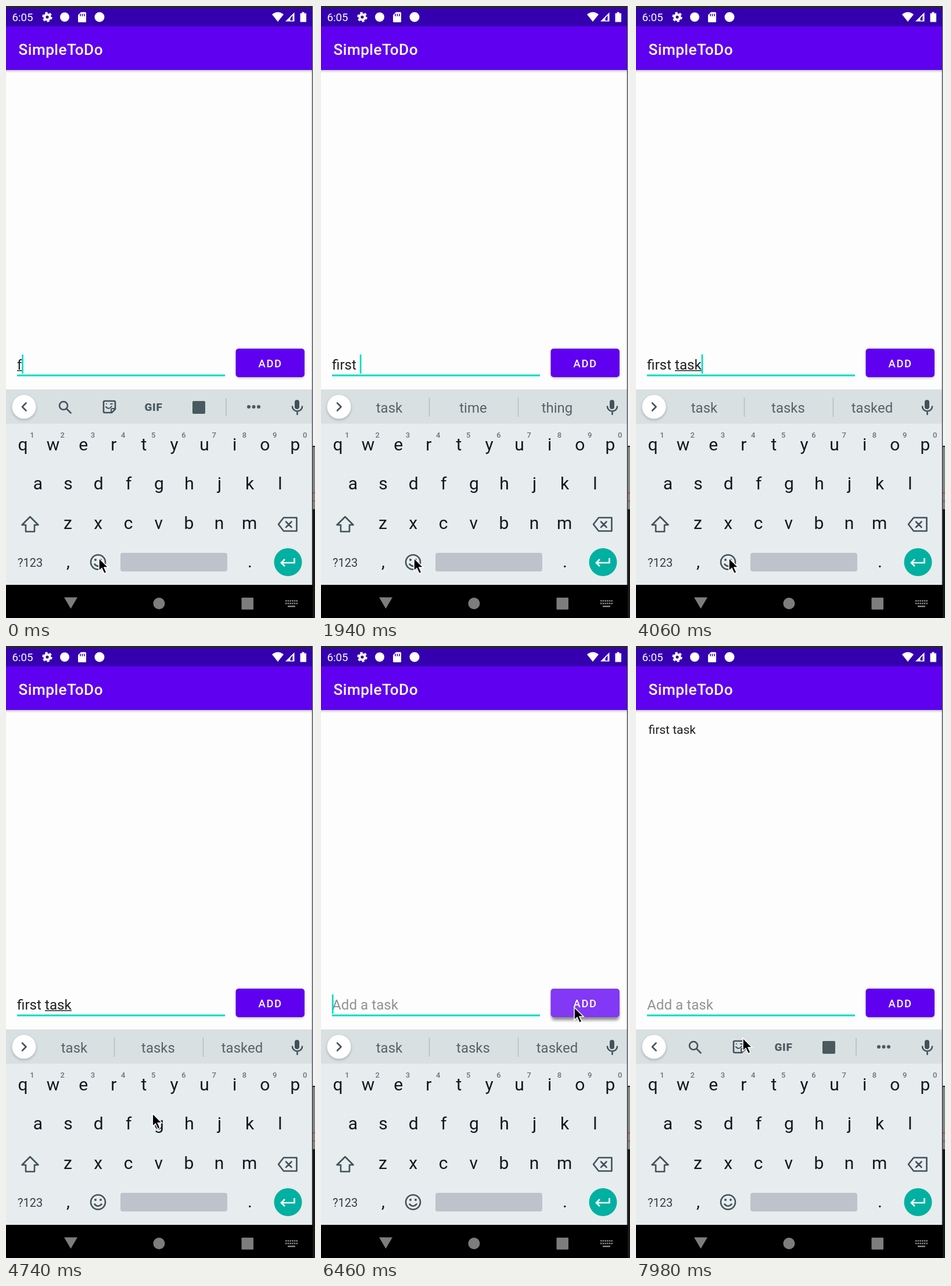
Recreate the animation shown at these times as an HTML page. Size 532x1052 px, loop 8 s.

```html
<!DOCTYPE html>
<html lang="en">
<head>
<meta charset="utf-8">
<title>To-do list</title>
<style>
html, body { margin: 0; width: 100%; height: 100%; overflow: hidden; background: #fdfdfd; }
svg { display: block; width: 100vw; height: 100vh; font-family: Roboto, Arial, sans-serif; }
text { white-space: pre; }
.mid { text-anchor: middle; }
.key { font-size: 30px; fill: #10191d; }
.digit { font-size: 13px; font-weight: 500; fill: #68747a; }
.word { font-size: 24px; fill: #566267; }
.line { fill: none; stroke: #42525a; stroke-width: 2.6; stroke-linejoin: round; stroke-linecap: round; }
</style>
</head>
<body>
<svg id="stage" viewBox="0 0 532 1052">
  <defs>
    <filter id="soft" x="-30%" y="-40%" width="160%" height="200%"><feGaussianBlur stdDeviation="2.5"/></filter>
    <linearGradient id="drop" x2="0" y2="1">
      <stop stop-color="#000" stop-opacity=".2"/><stop offset="1" stop-color="#000" stop-opacity="0"/>
    </linearGradient>
  </defs>
  <rect width="532" height="1052" fill="#fdfdfd"/>

  <!-- window behind the phone -->
  <rect x="528" width="4" height="757" fill="#f4f4f6"/>
  <rect x="528" y="757" width="4" height="108" fill="#858585"/>
  <path d="M528 757h4" stroke="#222" stroke-width="2"/>
  <path d="M528 837h4M528 851h4" stroke="#c0443c" stroke-width="2"/>
  <rect x="528" y="865" width="4" height="187" fill="#19191c"/>

  <!-- app and status bars -->
  <rect width="528" height="5" fill="#292435"/>
  <rect y="4" width="528" height="32" fill="#3500b0"/>
  <rect y="35" width="528" height="75" fill="#5f00f0"/>
  <rect y="110" width="528" height="5" fill="url(#drop)"/>
  <text x="10.5" y="26" font-size="18.7" fill="#fff">6:05</text>
  <g fill="#fff">
    <circle cx="71" cy="19" r="4.6" fill="none" stroke="#fff" stroke-width="4"/>
    <circle cx="71" cy="19" r="7.2" fill="none" stroke="#fff" stroke-width="3" stroke-dasharray="4 3.54"/>
    <circle cx="101" cy="19" r="8"/>
    <path d="M129 10.500h7.500q1.500 0 1.500 1.500v14.500q0 1.500-1.500 1.500h-11q-1.500 0-1.500-1.500v-11z"/>
    <path d="M128 13.500v4M131.500 13.500v4M135 13.500v4" stroke="#3500b0" stroke-width="1.600"/>
    <circle cx="161" cy="19" r="8.500"/>
    <path d="M458 14.500q10-8 20 0l-10 12.500z"/>
    <path d="M481 26.500L496.500 11v15.500z"/>
    <path d="M489.500 21v4h4v-9z" fill="#3500b0"/>
    <path d="M509.500 10.500h4v2h3.500v15h-10.500v-15h3z"/>
  </g>
  <text x="21.500" y="84" font-size="26.2" font-weight="500" letter-spacing=".45" fill="#fff">SimpleToDo</text>
  <text id="item" x="21.500" y="151" font-size="21" fill="#1d1d1d">first task</text>

  <!-- entry field -->
  <rect x="19" y="633.500" width="358" height="3" fill="#00dcc3"/>
  <text id="entry" x="19" y="624.500" font-size="24.2" fill="#202020"></text>
  <text id="hint" x="19" y="624.500" font-size="24.2" fill="#929292">Add a task</text>
  <rect id="underline" y="626" height="1.500" fill="#202020"/>
  <rect id="caret" y="599" width="2.700" height="33" fill="#00dcc3"/>

  <!-- add button -->
  <rect id="shadow" x="397" y="592" width="116" height="49" rx="5" filter="url(#soft)"/>
  <rect x="395.500" y="589" width="118.500" height="49" rx="5" fill="#5f00f0"/>
  <rect id="ripple" x="395.500" y="589" width="118.500" height="49" rx="5" fill="#fff"/>
  <text x="434.500" y="621" font-size="18.4" font-weight="500" letter-spacing="1.640" fill="#fff">ADD</text>

  <!-- keyboard -->
  <rect y="659" width="528" height="60" fill="#d9e0e2"/>
  <rect y="718" width="528" height="277" fill="#e7edee"/>
  <circle cx="31" cy="691" r="20.500" opacity=".22" filter="url(#soft)"/>
  <circle cx="31" cy="689" r="20.500" fill="#fff"/>
  <path id="chevron" class="line"/>
  <g id="words">
    <path d="M186.500 673v33M339.500 673v33" stroke="#b5bdc0" stroke-width="1.500"/>
    <text class="word mid" x="117.500" y="699"></text>
    <text class="word mid" x="262" y="699"></text>
    <text class="word mid" x="406.500" y="699"></text>
  </g>
  <g id="tools" fill="#4a5960">
    <g class="line"><circle cx="99" cy="687" r="7"/><path d="M104.500 692.500l7 7"/>
      <path d="M170 679h16q2 0 2 2v12l-6 6h-12q-2 0-2-2v-16q0-2 2-2z"/>
      <path d="M188 692h-5q-2 0-2 2v5M172 689q5 6 10-1M173 684h.1M180 684h3" stroke-width="2"/></g>
    <text class="mid" x="254" y="695.500" font-size="19" font-weight="900" letter-spacing=".6">GIF</text>
    <rect x="321" y="679" width="22" height="22" rx="2"/>
    <path d="M379 674v30" stroke="#b5bdc0" stroke-width="1.500"/>
    <circle cx="418" cy="689" r="3"/><circle cx="426.500" cy="689" r="3"/><circle cx="435" cy="689" r="3"/>
  </g>
  <rect x="497" y="677" width="8" height="16" rx="4" fill="#42525a"/>
  <path class="line" d="M493 688.500a8.500 8 0 0 0 17 0M501.500 697v5" stroke-linecap="butt"/>
  <g id="keys"></g>
  <path class="line" d="M41.500 878l14 14h-6.500v11.500h-15v-11.500h-6.500z"/>
  <path class="line" d="M478 879.500h22.500v23h-22.500l-9-11.500zM482 886.500l9.500 9.500M491.500 886.500l-9.500 9.500"/>
  <text x="20" y="963.500" font-size="20" fill="#333f44">?123</text>
  <g class="line"><circle cx="158.500" cy="956" r="12.500"/><path d="M152.500 959.500q6 6.500 12 0"/></g>
  <circle cx="154" cy="952" r="2" fill="#42525a"/><circle cx="163" cy="952" r="2" fill="#42525a"/>
  <rect x="197" y="940" width="184" height="32" rx="4" fill="#bec3cb"/>
  <circle cx="485.500" cy="956" r="24" fill="#00b0a1"/>
  <path d="M496.500 949v8h-22M480 951l-6 6 6 6" fill="none" stroke="#fff" stroke-width="2.700"/>

  <!-- navigation bar -->
  <rect y="995" width="528" height="57"/>
  <g fill="#7d7d7d">
    <path d="M100 1016.500h23l-11.500 19.500z"/>
    <circle cx="263.500" cy="1027" r="10"/>
    <rect x="405.500" y="1017" width="20.500" height="20.500" rx="1"/>
    <path d="M481 1022.500h21M481 1027h21" stroke="#8a8a8a" stroke-width="2.500" stroke-dasharray="2.500 1.200"/>
    <path d="M485 1032h13" stroke="#8a8a8a" stroke-width="2.500"/>
  </g>
  <path d="M527.500 0v995" stroke="#303036" stroke-width="1.300"/>

  <path id="pointer" d="M0 0v22l5-4.500 4 9 4-1.800-4-8.700h7z" fill="#000" stroke="#fff" stroke-width="1.500"/>
</svg>
<script>
const LOOP = 8000, SUGGEST_DELAY = 160;
const $ = id => document.getElementById(id);

// time, text, start of the word being composed, suggestions
const typing = [
  [0, "f", 0, "f for from"],
  [260, "fi", 0, "fi first find"],
  [460, "fir", 0, "fir first fire"],
  [700, "firs", 0, "firs first fits"],
  [960, "first", 0, "first firsts firstly"],
  [1500, "first ", 6, "task time thing"],
  [2200, "first t", 6, "t time thing"],
  [2440, "first ta", 6, "ta task take"],
  [2700, "first tas", 6, "tas task tasks"],
  [3000, "first task", 6, "task tasks tasked"],
  [6400, "", 0, ""]
];

// time, x, y
const pointerPath = [
  [0, 160, 949], [4300, 160, 949], [4740, 252, 804], [5200, 410, 645], [5420, 434, 622],
  [6100, 434, 622], [6300, 436, 621], [7100, 436, 621], [7600, 275, 650], [7980, 184, 674]
];

const latest = (list, t) => list.filter(entry => entry[0] <= t).pop();
const ramp = (t, from, to) => Math.min(1, Math.max(0, (t - from) / (to - from)));
const show = (el, on) => el.setAttribute("visibility", on ? "visible" : "hidden");

function buildKeys() {
  const label = (cls, x, y, s) => `<text class="${cls} mid" x="${x}" y="${y}">${s}</text>`;
  const row = (letters, x, y) => [...letters].map((s, i) => label("key", x + i * 52.1, y, s)).join("");
  const digits = [..."1234567890"].map((s, i) => label("digit", 45 + i * 52.2, 742, s)).join("");
  $("keys").innerHTML = digits + row("qwertyuiop", 29, 764) + row("asdfghjkl", 55, 831) +
    row("zxcvbnm", 106.5, 899) + label("key", 107, 965, ",") + label("key", 420, 965, ".");
}

function pointerAt(t) {
  const a = latest(pointerPath, t);
  const b = pointerPath[pointerPath.indexOf(a) + 1] || a;
  const k = a === b ? 0 : ramp(t, a[0], b[0]);
  return [a[1] + (b[1] - a[1]) * k, a[2] + (b[2] - a[2]) * k];
}

function drawEntry(t) {
  const [since, text, start] = latest(typing, t);
  const entry = $("entry");
  entry.textContent = text;
  const width = n => n ? entry.getSubStringLength(0, n) : 0;
  const end = width(text.length), from = width(start);
  $("underline").setAttribute("x", 19 + from);
  $("underline").setAttribute("width", Math.max(0, end - from));
  $("caret").setAttribute("x", 18.8 + end);
  show($("caret"), (t - since) % 1000 < 500);
  show($("hint"), !text);
}

function drawSuggestions(t) {
  const state = latest(typing, t - SUGGEST_DELAY);
  const words = state && state[3] ? state[3].split(" ") : [];
  const open = words.length > 0;
  document.querySelectorAll(".word").forEach((el, i) => el.textContent = words[i] || "");
  show($("words"), open);
  show($("tools"), !open);
  $("chevron").setAttribute("d", open ? "M28 682.500l6.500 6.500-6.500 6.500" : "M34.500 682.500l-6.500 6.500 6.500 6.500");
}

function draw(t) {
  drawEntry(t);
  drawSuggestions(t);
  const press = ramp(t, 6320, 6440) * (1 - ramp(t, 6580, 6860));
  $("ripple").setAttribute("opacity", 0.22 * press);
  $("shadow").setAttribute("opacity", 0.3 + 0.15 * press);
  $("shadow").setAttribute("y", 590 + 4 * press);
  $("item").setAttribute("opacity", ramp(t, 6560, 6700));
  $("pointer").setAttribute("transform", `translate(${pointerAt(t)})`);
}

buildKeys();
const begin = performance.now();
function tick() {
  draw((performance.now() - begin) % LOOP);
  requestAnimationFrame(tick);
}
tick();
</script>
</body>
</html>
```
